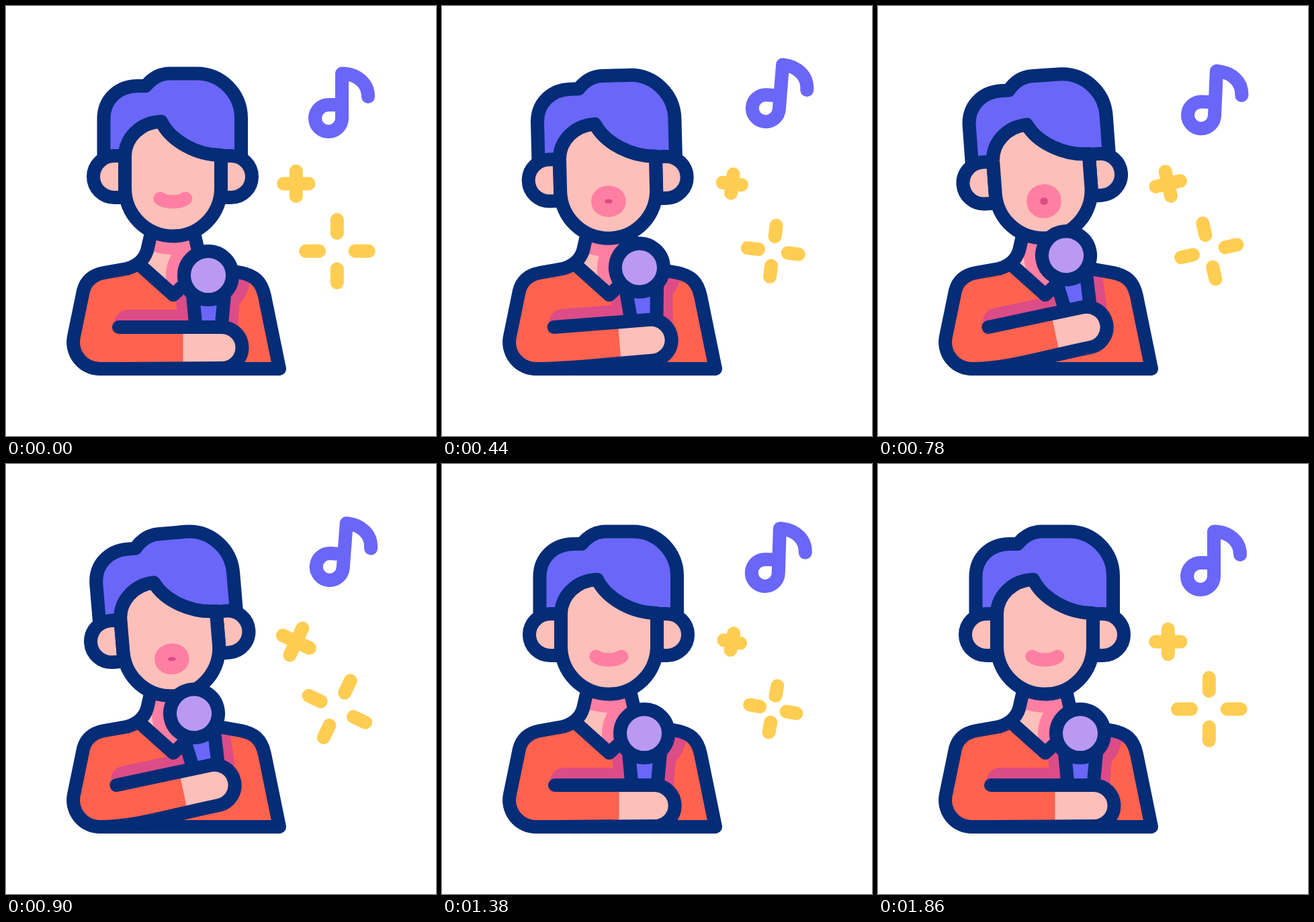
Recreate the animation shown at these times as an HTML page. Size 640 by 640 pixels, loop 2 s.

```html
<!DOCTYPE html>
<html lang="en">
<head>
<meta charset="utf-8">
<title>Singer</title>
<style>
  html, body { margin: 0; width: 100%; height: 100%; overflow: hidden; background: #fff; }
  svg { display: block; width: 100%; height: 100%; }
  .line, .gold, #note, #mouth { fill: none; stroke-width: 20; stroke-linecap: round; stroke-linejoin: round; }
  .line { stroke: #042c77; }
  .gold { stroke: #ffcd52; }
  .skin { fill: #fdbfb9; }
  .red { fill: #ff624f; }
  .violet { fill: #6a66f8; }
  .lilac { fill: #ba99f2; }
  .shade { fill: #dc4c87; }
  .blush { fill: #ff7fa2; }
  #note { stroke: #6a66f8; }
  #mouth { fill: #dc4c87; stroke: #ff7fa2; }
</style>
</head>
<body>
<svg viewBox="0 0 640 640">
  <defs>
    <path id="torso" d="M407 540H140A39.7 39.7 0 0 1 101 492L115 424C119 408 130 400 146 397L180 391C195 387 206 377 210 364L216 338H280L286 364C290 377 301 387 316 391L350 397C369 401 380 409 385 432Z"/>
    <path id="neck" d="M216 338L210 364Q207 378 201 387L249 430L295 387Q289 378 286 364L280 338Z"/>
    <path id="hair" d="M145.500 225V168C145.500 138 168 119 196 119H208C217 108 228 100.500 244 100.500H284C321 100.500 350 131 350 167V222"/>
    <clipPath id="inTorso"><use href="#torso"/></clipPath>
    <clipPath id="inNeck"><use href="#neck"/></clipPath>
  </defs>

  <use href="#torso" class="red"/>
  <g clip-path="url(#inTorso)" class="shade">
    <g data-move="mic">
      <circle cx="301" cy="401" r="63"/>
      <path d="M253 435L258 490H344L348 435Z"/>
    </g>
    <path data-move="arm" d="M-8 0C-8 -14 0 -26 14 -26H135V0Z"/>
  </g>
  <use href="#neck" class="skin"/>
  <g clip-path="url(#inNeck)" class="blush">
    <circle data-move="head" cx="248.500" cy="271" r="99"/>
    <circle data-move="mic" cx="301" cy="401" r="63"/>
  </g>
  <use href="#torso" class="line"/>
  <path class="line" d="M201 387L249 430L295 387"/>

  <g data-move="head">
    <use href="#hair" class="violet"/>
    <use href="#hair" class="line"/>
    <path class="line" style="fill:#fdbfb9" d="M177 223H161A31 31 0 0 0 161 285H177ZM320 223H335A31 31 0 0 1 335 285H320Z"/>
    <path class="line" style="fill:#fdbfb9" d="M177 271V222C178 196 200 173 231 172C246 202 285 222 320 222V271A71.500 71.500 0 0 1 177 271Z"/>
    <path id="mouth"/>
  </g>

  <g data-move="mic">
    <path class="line" style="fill:#6a66f8" d="M278 430L283 484H320L325 430Z"/>
    <circle class="line" style="fill:#ba99f2" cx="301" cy="401" r="36"/>
  </g>

  <path id="sleeve" class="red"/>
  <path id="hand" data-move="arm" class="skin"/>
  <path id="forearm" class="line"/>

  <path id="note" d="M500 167A20 20 0 1 1 480 147H500M500 167V100.500C523 101 539 115 539 135"/>
  <path id="plus" class="gold"/>
  <path id="spark" class="gold"/>
</svg>
<script>
const LOOP = 2000;
const PALM = 30.5;
const CUFF = 95.5;
const TURN = 2 * Math.PI;

const el = id => document.getElementById(id);
const mix = (a, b, p) => a + (b - a) * p;
const rad = deg => deg * Math.PI / 180;
const ramp = (t, from, to) => Math.min(1, Math.max(0, (t - from) / (to - from)));

// Eased step from 0 to 1.
const ease = (t, from, to) => (1 - Math.cos(Math.PI * ramp(t, from, to))) / 2;
// Rises, holds at 1, then falls.
const hold = (t, rise, full, fall, end) => ease(t, rise, full) - ease(t, fall, end);
// Smooth beats that start and end at 0.
const pulse = (t, from, to, beats = 1) => (1 - Math.cos(TURN * beats * ramp(t, from, to))) / 2;

function move(name, transform) {
  document.querySelectorAll(`[data-move=${name}]`)
    .forEach(node => node.setAttribute('transform', transform));
}

function drawHead(t) {
  const nod = pulse(t, 330, 1370, 2);
  const back = pulse(t, 600, 1110);
  const tilt = 5.2 * back + 1.5 * pulse(t, 220, 700);
  move('head', `translate(0 ${8.4 * nod + 2 * back}) rotate(${-tilt} 248 305)`);
}

// The lips are one closed stroke: a flat smile that opens into an oval.
function drawMouth(t) {
  const open = hold(t, 290, 420, 1140, 1370);
  const gape = 12.8 + 6.5 * pulse(t, 400, 1360, 2);
  const w = mix(19, 15.7, open), c = w * mix(0.5, 1, open);
  const x = 248.3, y = mix(286.5, 287.5, open);
  const top = y + mix(5, -gape, open) * 4 / 3;
  const bottom = y + mix(5, gape, open) * 4 / 3;
  el('mouth').setAttribute('d',
    `M${x - w} ${y}C${x - c} ${top} ${x + c} ${top} ${x + w} ${y}` +
    `C${x + c} ${bottom} ${x - c} ${bottom} ${x - w} ${y}Z`);
}

function drawArm(t) {
  const lift = 12 * hold(t, 190, 790, 1030, 1360);
  const reach = 153 - 10.5 * hold(t, 220, 440, 1250, 1500);
  const cos = Math.cos(rad(lift)), sin = Math.sin(rad(lift));
  const sx = 168 - lift * 0.3, sy = 478;
  const at = (u, v) => `${sx + u * cos + v * sin} ${sy - u * sin + v * cos}`;
  const cap = `A${PALM} ${PALM} 0 0 1 `;
  const outline = `M${sx} ${sy}L${at(reach, 0)}${cap}${at(reach, 2 * PALM)}` +
    `C${at(reach - 90, 2 * PALM)} 190 540 140 540`;
  el('forearm').setAttribute('d', outline);
  el('sleeve').setAttribute('d', outline + 'Z');
  el('hand').setAttribute('d', `M${CUFF} 0H${reach}${cap}${reach} ${2 * PALM}H${CUFF}Z`);
  move('arm', `translate(${sx} ${sy}) rotate(${-lift})`);
  move('mic', `rotate(${-lift} 149 486)`);
}

function drawNote(t) {
  const swing = hold(t, 220, 425, 1150, 1620);
  const beat = Math.cos(TURN * (t - 425) / 447);
  el('note').setAttribute('transform',
    `translate(0 ${-14.5 * swing * beat}) rotate(${swing * (1.6 + 3 * beat)} 490 190)`);
}

function drawStar(id, cx, cy, inner, outer, turn) {
  let d = '';
  for (let i = 0; i < 4; i++) {
    const a = rad(turn + i * 90);
    const at = r => `${cx + r * Math.sin(a)} ${cy - r * Math.cos(a)}`;
    d += `M${at(inner)}L${at(outer)}`;
  }
  el(id).setAttribute('d', d);
}

function drawStars(t) {
  const spin = 360 * ease(t, 300, 1870);
  const shrink = hold(t, 260, 540, 1370, 1860);
  const swell = pulse(t, 540, 1375);
  const plus = 1 - shrink * (0.33 - 0.53 * swell);
  const spark = 1 - shrink * (0.25 - 0.26 * swell);
  drawStar('plus', 431.8, 264.5, 0, 18.7 * plus, spin);
  drawStar('spark', 492.8, 364.8, 26.8 * spark, 46.8 * spark, spin);
}

const parts = [drawHead, drawMouth, drawArm, drawNote, drawStars];
const start = performance.now();
function tick() {
  const t = (performance.now() - start) % LOOP;
  parts.forEach(draw => draw(t));
  requestAnimationFrame(tick);
}
tick();
</script>
</body>
</html>
```
